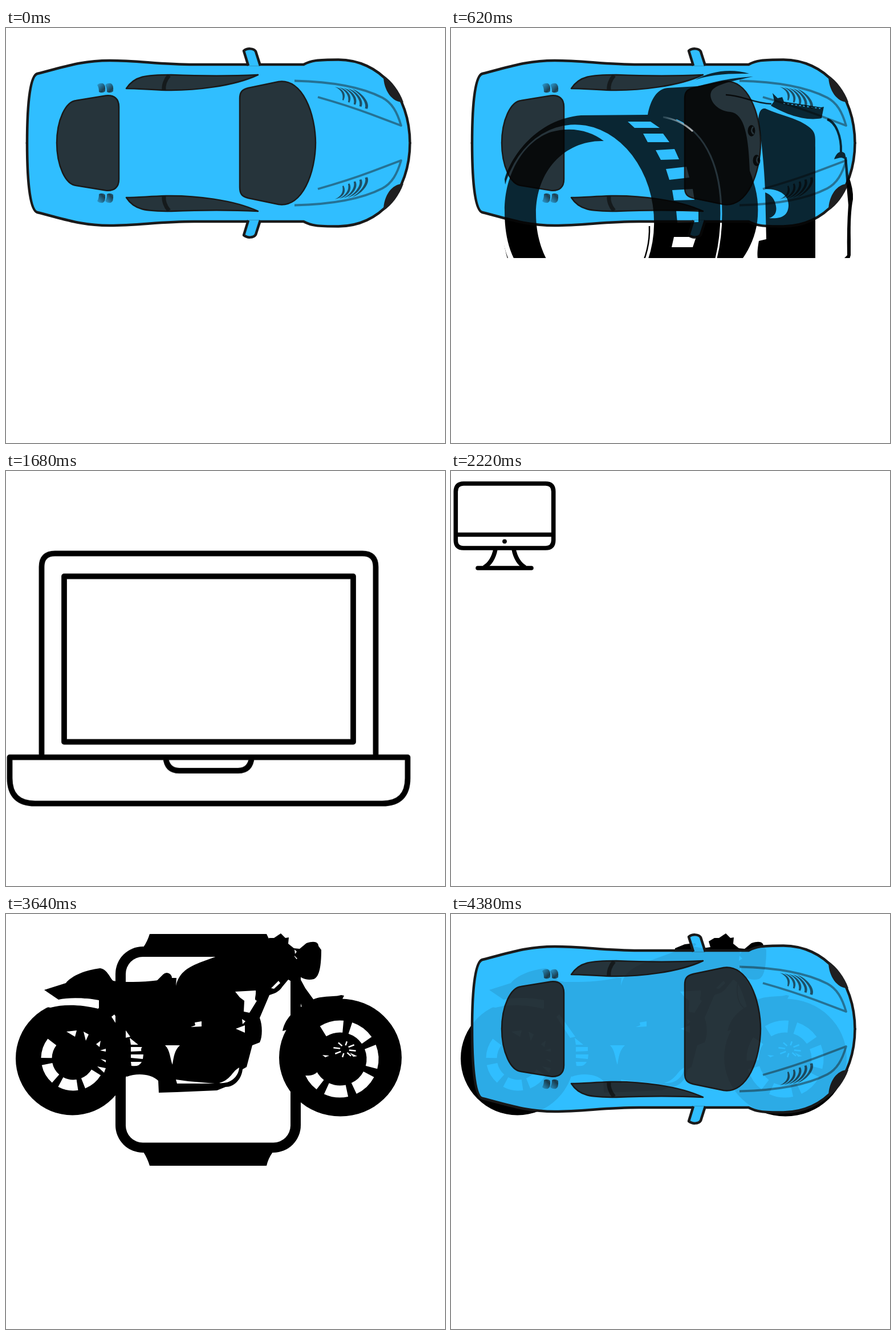
Write an HTML page with a canvas that moves like this. It is 770 px wide and 727 px high and loops after 4440 ms.

```html
<!DOCTYPE html>
<html lang="en">
<head>
<meta charset="utf-8">
<title>Dissolving icons</title>
<style>
  html, body { margin: 0; width: 100%; height: 100%; overflow: hidden; background: #fff; }
  canvas { display: block; }
</style>
</head>
<body>
<canvas id="stage" width="770" height="727"></canvas>
<script>
const W = 770, H = 727;
const HOLD = 200, STEP = 60, SLIDE = 740;

// Paints one slide on its own transparent canvas.
function layer(paint) {
  const canvas = document.createElement('canvas');
  canvas.width = W;
  canvas.height = H;
  const c = canvas.getContext('2d');
  c.lineJoin = 'round';
  const fill = (d, color = '#000') => {
    c.fillStyle = color;
    c.fill(new Path2D(d));
  };
  const line = (d, width, color = '#000', cap = 'butt') => {
    c.lineWidth = width;
    c.lineCap = cap;
    c.strokeStyle = color;
    c.stroke(new Path2D(d));
  };
  const erase = draw => {
    c.globalCompositeOperation = 'destination-out';
    draw();
    c.globalCompositeOperation = 'source-over';
  };
  paint({ c, fill, line, erase });
  return canvas;
}

const ellipse = (x, y, rx, ry = rx) =>
  `M${x - rx} ${y}a${rx} ${ry} 0 1 1 ${2 * rx} 0a${rx} ${ry} 0 1 1 ${-2 * rx} 0z`;

const car = layer(({ c, fill, line }) => {
  const ink = '#1a1a1a', glass = '#26343b', trim = 'rgba(26,26,26,.46)';
  const shape = (d, color, width) => { fill(d, color); line(d, width, ink); };

  const half = () => {
    shape('M37 203C37 150 40 84 55 80C100 69 130 57 182 57C232 57 270 64 330 64H522C535 57 545 55.5 583 55.5C655 56 708.5 115 708.5 203', '#30beff', 4.5);
    shape('M425 66L417 40C423 35 434 35 438 41L446 66', '#30beff', 4.5);
    shape('M211 106C225 84 245 82 290 82C340 84 400 84 442 82C400 102 330 110 280 109C250 108 230 106 211 106Z', glass, 2.5);
    line('M286 83C280 90 276 100 277 109', 7, '#151a1c');
    shape('M89 203C89 160 105 129 123 127L175 118.5C190 117 198 124 198 138V203', glass, 2.5);
    shape('M410 203V124C410 112 414 108 425 105L478 94C520 88 543 150 543 203', glass, 2.5);
    line('M506 92.5C570 94 625 104 660 122C677 131 686 147 693 171L640 151Q600 136 547 121', 3.8, trim);
    fill('M662 83C676 92 690 110 697 130C678 131 662 110 662 83Z', '#1f1f20');

    for (let i = 0; i < 5; i++) {
      const x = 577 + 7.5 * i, y = 103 + i, ex = 592 + 10.5 * i, ey = 127 + 3.7 * i;
      fill(`M${x} ${y}C${x + 14} ${y + 3} ${ex + 6} ${ey - 12} ${ex} ${ey}l${-2 - i * .6} -1C${ex} ${ey - 11} ${x + 12} ${y + 6} ${x} ${y}Z`, '#1d5067');
    }
    for (const x of [160, 174]) {
      const shade = c.createLinearGradient(x, 98, x + 14, 112);
      shade.addColorStop(0, '#2b9fd6');
      shade.addColorStop(.75, '#1d4052');
      shade.addColorStop(1, '#22647f');
      fill(`M${x} 100q3 -4 10 -3q5 2 4 14q-5 4 -11 1q0 -8 -3 -12Z`, shade);
    }
  };
  half();
  c.setTransform(1, 0, 0, -1, 0, 403);
  half();
});

const camera = layer(({ c, fill, line, erase }) => {
  // body and barrel
  fill('M94 265C105 225 150 160 228 153L345 152C350 125 362 106 380 105L432 102C455 97 480 88 530 85C500 92 460 98 456 113C452 125 465 145 490 147C515 150 522 190 524 250C535 280 540 300 538 330C535 380 505 420 473 442L512 439C530 435 543 428 546 416C536 412 536 395 540 373L553 370L551 285C549 240 545 200 539 160C540 148 543 140 551 141C580 154 610 158 630 175C640 184 639 190 639 210L639 430C637 455 625 467 600 468C550 471 490 470 435 470C410 485 370 492 330 494C325 501 315 505 262 506C240 511 200 513 170 498C110 465 88 395 88 320L98 300Z');

  erase(() => {
    c.beginPath();
    c.ellipse(221.5, 336, 134.5, 167, -.07, 0, 7);
    c.fill();
    fill('M310 164h40l16 11h-44zM337 185h35l11 15h-38zM359 214l33-2 8 18-32 1zM377 247l36-4 5 19-35 4zM388 284l36-2 3 19-36 1zM395 320l39-1v21l-37 1zM391 366h39l-6 18h-37zM381 409l36-1-8 9-33 2zM356 448l40-5-8 7-36 3zM335 474l32-2-12 4-25 2z');
    line('M395 161C450 185 474 250 474 325C474 385 460 430 445 452', 3);
    fill('M551 282C580 282 592 295 592 310C592 328 580 335 558 333C568 330 572 322 570 312C568 300 562 292 551 288Z');
  });
  const shine = c.createLinearGradient(372, 0, 425, 0);
  shine.addColorStop(0, '#222');
  shine.addColorStop(1, '#ddd');
  line('M372 156C395 160 410 168 424 181', 3, shine);
  line('M446 451L437 462', 3, '#555');

  // front ring with scratches
  fill('M268 198C245 180 212 172 176 182C128 198 94 255 94 320C94 360 101 405 135 438L176 471L150 431L172 456L164 434L209 465L187 440L242 474C190 452 149 400 149 325C149 250 200 196 268 198Z');
  line('M348 347C350 400 322 462 263 502', 2.5);

  for (const [x, y] of [[527, 180], [536, 232]]) {
    fill(ellipse(x, y, 6.5, 10));
    erase(() => line(`M${x + 3} ${y - 7}q-6 7 1 13`, 2.5));
  }

  // top and dial
  fill('M428 91C455 76 490 70 523 80C490 80 460 80 428 91Z');
  line('M482 117C512 118 530 132 562 133', 2.5);
  fill('M564 114L573 123L581 121L584 129L649 139L654 138L650 158C620 164 585 150 561 136L567 128Z');
  erase(() => {
    c.setLineDash([3, 4]);
    line('M583 132L648 141', 1.5);
    c.setLineDash([]);
  });

  // right edge
  line('M660 160C675 165 685 190 684 217', 4);
  fill('M672 230C676 218 684 213 691 220L694 233C686 224 681 228 672 230Z');
  fill('M690 228L694 226L697 258Q706 282 705 300Q700 325 701 370V398Q698 410 692 414Q694 440 680 455Q665 462 639 461Q670 458 682 448Q692 435 685 408L695 398Q694 350 697 310Q693 270 690 228Z');
});

const laptop = layer(({ line }) => {
  const outline = [
    'M62.5 501V168Q62.5 144.5 86 144.5H625Q648.5 144.5 648.5 168V501',
    'M102 184.5H609V474.5H102Z',
    'M6.5 501.5H704.5V538Q704.5 582.5 660 582.5H51Q6.5 582.5 6.5 538Z',
    'M280 501Q282 525 304 525H407Q429 525 431 501'
  ].join('');
  line(outline, 10, '#333');
  line(outline, 8.6);
});

const monitor = layer(({ fill, line }) => {
  line('M22 22H166Q179.7 22 179.7 36V121Q179.7 135 166 135H22Q8.3 135 8.3 121V36Q8.3 22 22 22ZM8 111.5H180', 7.6);
  fill(ellipse(94, 123.3, 3.9));
  line('M78 137C75 152 68 163 58 169M110 137C113 152 120 163 130 169', 7.6);
  line('M47 170H141', 7.6, '#000', 'round');
});

const watch = layer(({ c, fill, line, erase }) => {
  const box = (x, y, w, h, r) => {
    c.beginPath();
    c.roundRect(x, y, w, h, r);
    c.fill();
  };
  box(192, 57, 325, 361, 48);
  fill('M252 35H457L468 58H241Q248 48 252 35ZM241 417H468Q460 428 457 441H252Q248 428 241 417Z');
  erase(() => box(210, 75, 289, 325.5, 30));
  box(514, 193, 39, 90, [0, 22, 22, 0]);
  line('M246 148L282 112M300 139L327 112M363 121L372 112M246 193L264 175M246 238L327 157', 18, '#000', 'round');
  fill(ellipse(345, 139, 9) + ellipse(282, 157, 9));
});

const motorbike = layer(({ c, fill, line, erase }) => {
  fill('M67 133L105 121C115 108 140 98 165 95C178 97 182 112 188 117L200 119C230 119 260 119 290 112L299 112L298 126C303 105 315 95 340 85L392 66L393 60L410 53L428 51L430 54L425 57L442 60L455 58L452 48L462 42L470 42L482 34L490 42L496 41L495 52L505 60L515 61L527 51C542 46 548 50 548 56L553 63C553 90 550 110 540 114C528 117 518 113 512 106L525 130L541 152L520 166C512 140 505 118 495 115L485 127C478 138 468 140 462 142L445 182C450 195 450 215 445 225L432 230L422 268L415 272C413 290 400 303 385 303L370 309L300 312L268 313L267 292C255 280 230 278 212 285L180 255L163 165V152C140 146 110 146 92 150Z');
  fill('M485 205C490 180 510 165 527 158C545 140 570 147 588 142L593 143L588 153L540 190Z');
  fill(ellipse(116.5, 253, 99.5) + ellipse(586.5, 251.5, 107.5, 103));
  line('M503 118C500 140 503 158 516 166', 1.8);

  const slots = (x, y, r, width, from, count) => {
    c.lineCap = 'butt';
    c.lineWidth = width;
    for (let i = 0; i < count; i++) {
      const a = from + i * .87;
      c.beginPath();
      c.arc(x, y, r, a - .32, a + .32);
      c.stroke();
    }
  };
  erase(() => {
    fill('M72 163C95 148 130 144 163 151L162 166C130 158 100 158 78 164Z');
    slots(118, 253, 47, 19, .87, 4);
    slots(586, 254, 57, 21, -1.8, 7);
    for (let i = 0; i < 8; i++) {
      const a = i * .785 + .2, x = Math.cos(a), y = Math.sin(a);
      line(`M${594 + 8 * x} ${237 + 7 * y}L${594 + 20 * x} ${237 + 14 * y}`, 2.5);
    }
    fill('M603 243L616 249L609 250ZM555 247L567 248L560 251Z');
    // rear hub
    fill('M106 206L124 204L121 215ZM136 206L145 211L140 222ZM158 228L166 222L164 233ZM165 239L175 236V241ZM166 254L175 256V260ZM160 267L175 270L172 278Z');
    // frame and engine gaps
    fill('M190 176L218 215L209 217L185 180ZM217 217L232 229H219ZM219 233H240V240L219 241ZM219 246H241L240 254L219 252ZM219 259H238Q234 268 220 266Z');
    fill('M279 230H305C296 238 294 250 292 264C288 255 288 238 279 230ZM324 198L332 195L331 190L343 188V197Z');
    fill('M298 290L320 293L366 297L300 297ZM374 296C395 290 396 276 409 269C408 284 395 298 374 296Z');
    fill('M402 136L438 134C439 145 434 150 440 152L427 173L417 171L418 152L410 146ZM403 201L419 195V208ZM414 184L420 188L415 193Z');
    fill('M465 130L478 117L481 121L470 131ZM506 62L510 66L507 70ZM506 73L511 78L505 82ZM505 92L509 91V104Z');
  });
});

// Each slide shows the next one only inside its own picture area.
const slides = [
  { art: car, w: 745, h: 403 },
  { art: camera, w: W, h: 554 },
  { art: laptop, w: W, h: H },
  { art: monitor, w: 188, h: 178 },
  { art: watch, w: W, h: H },
  { art: motorbike, w: W, h: H }
];
const stage = document.getElementById('stage').getContext('2d');

function draw(now) {
  const t = now % (SLIDE * slides.length);
  const index = Math.floor(t / SLIDE);
  const { art, w, h } = slides[index];
  const next = slides[(index + 1) % slides.length].art;
  const step = Math.max(0, Math.floor((t % SLIDE - HOLD) / STEP) + 1);
  const blend = (mode, alpha) => {
    stage.globalCompositeOperation = mode;
    stage.globalAlpha = alpha;
    stage.drawImage(next, 0, 0, w, h, 0, 0, w, h);
  };

  stage.globalCompositeOperation = 'source-over';
  stage.globalAlpha = 1;
  stage.clearRect(0, 0, W, H);
  stage.drawImage(art, 0, 0);
  // Mixes over the old shape, but appears at once past the halfway step elsewhere.
  if (step) blend('source-atop', step / 10);
  if (step > 5) blend('destination-over', 1);
  requestAnimationFrame(draw);
}
draw(performance.now());
</script>
</body>
</html>
```
